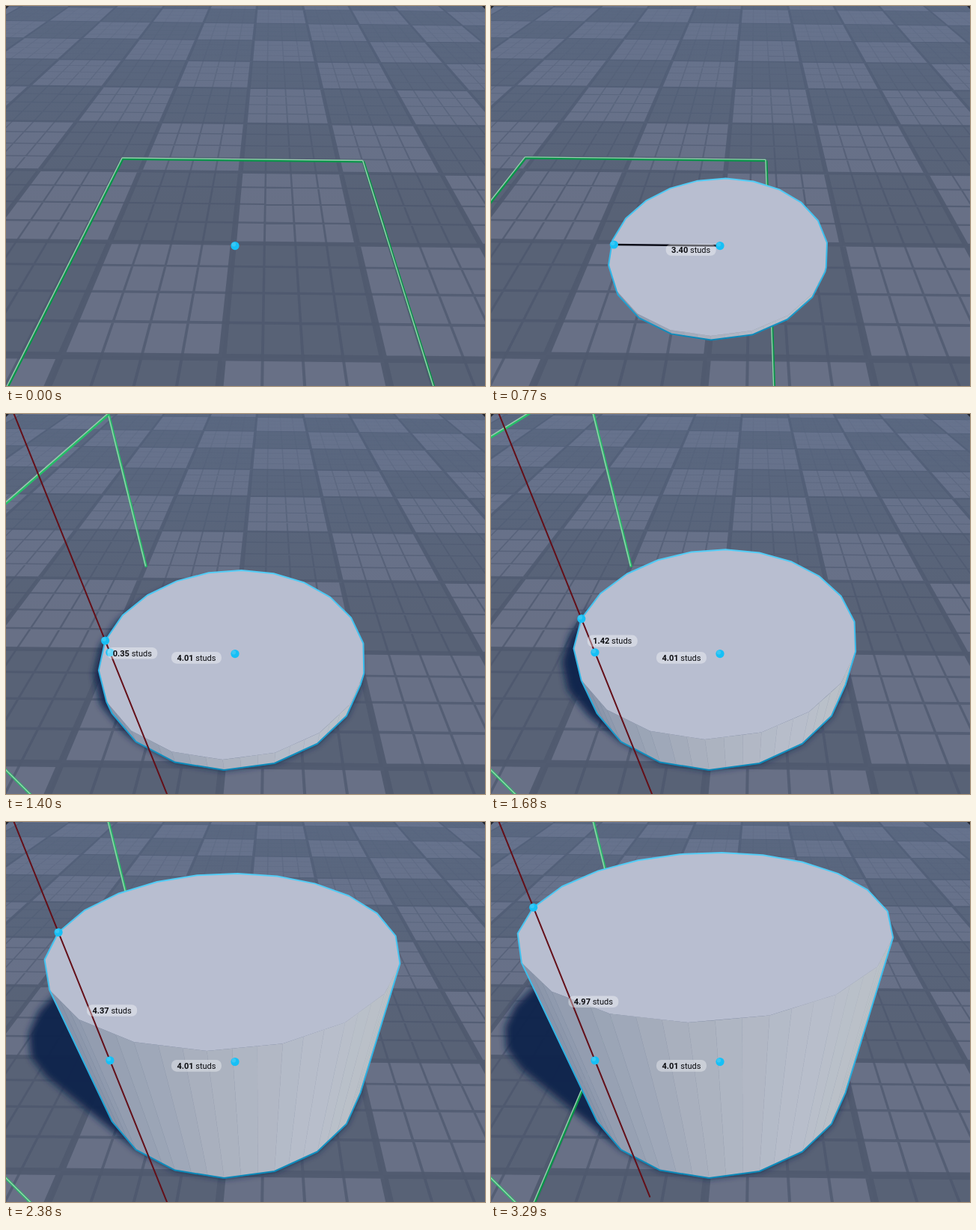
These frames come from a looping animation (640x508 px, 3.5 s). An HTML page:

```html
<!DOCTYPE html>
<html>
<head>
<meta charset="utf-8">
<style>
  html, body { margin: 0; width: 100%; height: 100%; overflow: hidden; background: #5b657b; }
  svg { display: block; width: 640px; height: 508px; }
  text { font: 11px Roboto, Arial, sans-serif; text-anchor: middle; fill: #0b0c10; }
  tspan { font-weight: 700; }
</style>
</head>
<body>
<svg id="stage" viewBox="0 0 640 508">
  <defs>
    <linearGradient id="rim" x1="0" y1="0" x2="0" y2="1">
      <stop offset="0" stop-color="#54cdf6"/>
      <stop offset=".6" stop-color="#2fb5e6"/>
      <stop offset="1" stop-color="#0a86b6"/>
    </linearGradient>
    <linearGradient id="haze" x1="0" y1="0" x2="0" y2="1">
      <stop offset="0" stop-color="#5f7ba6" stop-opacity=".22"/>
      <stop offset=".55" stop-color="#5f7ba6" stop-opacity="0"/>
    </linearGradient>
    <filter id="soft" x="-20%" y="-20%" width="140%" height="140%"><feGaussianBlur stdDeviation="5"/></filter>
  </defs>
  <g id="ground"></g>
  <rect width="640" height="508" fill="url(#haze)"/>
  <path d="M0 0h4L0 4zM640 0h-4l4 4z" fill="#23262f"/>
  <g id="scene"></g>
</svg>
<script>
const ground = document.getElementById('ground');
const scene = document.getElementById('scene');
const STUDS = 4;                      // studs per floor tile
const HALF = 1.245;                   // half size of the green guide, in tiles
const CENTER = { x: .014, z: .03 };
const SIDES = 20;

// Perspective of a point given in tiles; y points up.
function project(x, y, z) {
  const k = -.2349 * y;
  const w = 1 - .232 * z + k;
  return [(304 + 165.5 * x - 82.1 * z + 336.5 * k) / w,
          (317 + 1.8 * x + 43.6 * z + 810 * k) / w];
}

const path = pts => 'M' + pts.map(p => p[0].toFixed(2) + ' ' + p[1].toFixed(2)).join('L') + 'Z';
const floorRect = (x0, z0, x1, z1) =>
  path([project(x0, 0, z0), project(x1, 0, z0), project(x1, 0, z1), project(x0, 0, z1)]);
const shape = (d, attrs) => `<path d="${d}" ${attrs}/>`;
const line = (a, b, color, width, dx = 0, dy = 0) =>
  `<line x1="${a[0] + dx}" y1="${a[1] + dy}" x2="${b[0] + dx}" y2="${b[1] + dy}" stroke="${color}" stroke-width="${width}"/>`;

function buildGround() {
  const X0 = -7, X1 = 7, Z0 = -9, Z1 = 2;
  let light = '', dark = '', major = '', minor = '';
  for (let z = Z0; z < Z1; z++) {
    let row = '';
    for (let x = X0; x < X1; x++) {
      const tile = floorRect(x, z, x + 1, z + 1);
      if ((x + z) & 1) light += tile; else dark += tile;
      for (let i = 1; i < 4; i++) {
        const m = x + i / 4;
        row += floorRect(m - .009, z, m + .009, z + 1);
      }
    }
    for (let i = 1; i < 4; i++) {
      const m = z + i / 4;
      row += floorRect(X0, m - .011, X1, m + .011);
    }
    const fade = Math.max(.12, Math.min(.68, .68 + .085 * (z + 1)));
    minor += shape(row, `fill="#4c566c" fill-opacity="${fade}"`);
    major += floorRect(X0, z - .024, X1, z + .024);
  }
  for (let x = X0; x <= X1; x++) major += floorRect(x - .024, Z0, x + .024, Z1);
  ground.innerHTML = shape(dark, 'fill="#586276"') + shape(light, 'fill="#687086"') +
    minor + shape(major, 'fill="#4f596e" fill-opacity=".9"');
}

// Values between [time, value] points.
function track(points, t) {
  if (t <= points[0][0]) return points[0][1];
  for (let i = 1; i < points.length; i++) {
    const [t0, a] = points[i - 1], [t1, b] = points[i];
    if (t <= t1) return a + (b - a) * (t - t0) / (t1 - t0);
  }
  return points[points.length - 1][1];
}
const RADIUS = [[70, 0], [210, .4], [350, 1.25], [560, 2.51], [770, 3.4], [980, 3.92], [1120, 4.01]];
const HEIGHT = [[1190, 0], [1470, .7], [1610, 1.42], [1680, 1.42], [1750, 2.15], [1890, 2.53],
  [1960, 3.33], [2170, 4.1], [2310, 4.37], [2380, 4.37], [2660, 4.75], [2870, 4.97]];

// Convex outline of a set of points.
function hull(points) {
  const sorted = points.slice().sort((a, b) => a[0] - b[0] || a[1] - b[1]);
  const half = list => {
    const out = [];
    for (const p of list) {
      while (out.length > 1) {
        const [a, b] = out.slice(-2);
        if ((b[0] - a[0]) * (p[1] - a[1]) - (b[1] - a[1]) * (p[0] - a[0]) > 0) break;
        out.pop();
      }
      out.push(p);
    }
    out.pop();
    return out;
  };
  return half(sorted).concat(half(sorted.reverse()));
}

function ring(radius, y, dx = 0, dz = 0) {
  return Array.from({ length: SIDES }, (_, i) => {
    const a = i * 2 * Math.PI / SIDES;
    return project(CENTER.x + dx + radius * Math.cos(a), y, CENTER.z + dz + radius * Math.sin(a));
  });
}

const SHADES = [[-1, [130, 141, 164]], [-.75, [138, 149, 170]], [-.4, [153, 163, 181]],
  [0, [171, 178, 191]], [.5, [184, 190, 203]], [1, [187, 194, 198]]];
function shade(u) {
  const rgb = [0, 1, 2].map(c => Math.round(track(SHADES.map(([p, color]) => [p, color[c]]), u)));
  return `rgb(${rgb})`;
}

function cylinder(radius, h) {
  const bottom = ring(radius, 0), top = ring(radius, h);
  const outline = path(hull(bottom.concat(top)));
  const mix = (a, b, f) => [a[0] + (b[0] - a[0]) * f, a[1] + (b[1] - a[1]) * f];
  const strips = 3;
  let out = '';
  for (let i = 0; i < SIDES; i++) {
    const j = (i + 1) % SIDES;
    const [a, b, c] = [bottom[i], bottom[j], top[i]];
    const facing = (b[0] - a[0]) * (c[1] - a[1]) - (b[1] - a[1]) * (c[0] - a[0]);
    if (facing <= 0) continue;
    for (let s = 0; s < strips; s++) {
      const f = s / strips, g = (s + 1) / strips;
      const color = shade(Math.cos((i + f + .5 / strips) * 2 * Math.PI / SIDES));
      out += shape(path([mix(a, b, f), mix(a, b, g), mix(c, top[j], g), mix(c, top[j], f)]),
        `fill="${color}" stroke="${color}" stroke-width=".6"`);
    }
  }
  return out + shape(path(top), 'fill="#b8bed0"') +
    shape(outline, 'fill="none" stroke="url(#rim)" stroke-width="2" stroke-linejoin="round"');
}

function shadow(radius, h) {
  const cast = hull(ring(radius, 0).concat(ring(radius, 0, -.77 * h, -.57 * h)));
  return shape(path(cast), 'fill="#10254c" fill-opacity=".95" filter="url(#soft)"');
}

const guide = (a, b, color) => line(a, b, color, 3.4) + line(a, b, '#9bcdb0', 1.4, -.9, -1.2);

function floorGuide(x) {
  const c = [[-1, -1], [1, -1], [1, 1], [-1, 1]].map(([i, j]) =>
    project(x + i * HALF, 0, CENTER.z + j * HALF));
  return c.map((p, i) => guide(p, c[(i + 1) % 4], '#0a944a')).join('');
}

function wallGuide(x, h) {
  const low = Math.max(0, h - HALF), high = h + HALF;
  const corner = (y, side) => project(x, y, CENTER.z + side * HALF);
  const color = '#25bd68';
  let out = guide(corner(low, -1), corner(high, -1), color) +
    guide(corner(low, 1), corner(high, 1), color) +
    guide(corner(high, -1), corner(high, 1), color);
  if (h > HALF - .02) out += guide(corner(low, -1), corner(low, 1), '#0a944a');
  return out;
}

const dot = ([x, y]) => `<circle cx="${x}" cy="${y}" r="5.6" fill="#16c0f6"/>` +
  `<circle cx="${x - 1.6}" cy="${y - 1.8}" r="2.8" fill="#55cdf3" fill-opacity=".6"/>`;

function label([px, py], studs) {
  const x = px + 32, y = py + 6.2;
  return `<rect x="${x - 33.5}" y="${y - 7.8}" width="67" height="15.6" rx="7" fill="#fff" fill-opacity=".36"/>` +
    `<text x="${x}" y="${y + 4}"><tspan>${studs.toFixed(2)}</tspan> studs</text>`;
}

function draw(t) {
  const radius = track(RADIUS, t) / STUDS;
  const h = track(HEIGHT, t) / STUDS;
  const lifting = t >= 1260;
  const edge = CENTER.x - radius;
  const middle = project(CENTER.x, 0, CENTER.z);
  const handle = project(edge, 0, CENTER.z);
  let out = '';

  if (lifting) out += shadow(radius, h) + wallGuide(edge, h);
  else out += floorGuide(edge);
  if (radius > 0) out += cylinder(radius, Math.max(.05, h));
  if (lifting) out += line(project(edge, h - 3.75, CENTER.z), project(edge, h + 2.5, CENTER.z), '#640f18', 2);
  else if (radius > 0) out += line(middle, handle, '#0a0b16', 2.4);

  out += dot(middle);
  if (radius > 0) {
    out += dot(handle) + label(project(CENTER.x - radius / 2, 0, CENTER.z), radius * STUDS);
  }
  if (lifting) {
    const shown = track(HEIGHT, t - 70);   // the readout trails the handle by one step
    out += dot(project(edge, h, CENTER.z)) + label(project(edge, shown / STUDS / 2, CENTER.z), shown);
  }
  scene.innerHTML = out;
}

buildGround();
let last = -1;
const start = performance.now();
function tick() {
  const now = (performance.now() - start) % 3500;
  const t = now < 140 ? 0 : Math.min(3290, Math.floor(now / 70) * 70);
  if (t !== last) draw(last = t);
  requestAnimationFrame(tick);
}
tick();
</script>
</body>
</html>
```
